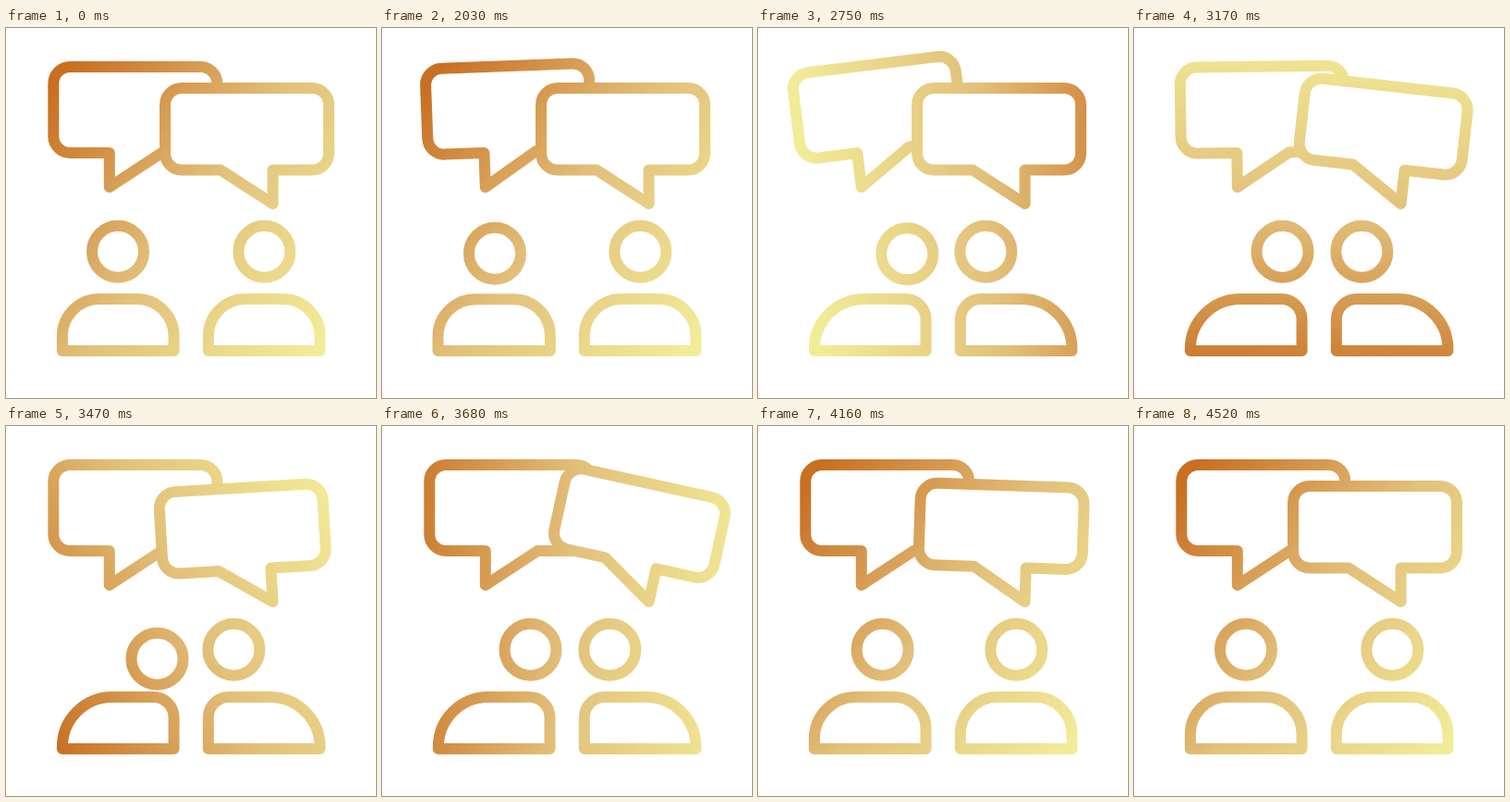
Animation, 400 px wide and 400 px high, one loop 4.55 s. Source, as an HTML page with a canvas:

```html
<!DOCTYPE html>
<html lang="en">
<head>
<meta charset="utf-8">
<title>Conversation</title>
<style>
  html, body { margin: 0; width: 100%; height: 100%; overflow: hidden; background: #fff; }
  canvas { display: block; width: 400px; height: 400px; }
</style>
</head>
<body>
<canvas id="stage" width="400" height="400"></canvas>
<script>
const ctx = document.getElementById('stage').getContext('2d');
const LOOP = 4550, START = 2000, STEP = 30;
const SWING = 212, TURN = 300, DIP = 240;

const unit = (t, start, span) => Math.min(1, Math.max(0, (t - start) / span));
const ease = u => Math.sin(Math.PI * u / 2) ** 2;
const bump = (t, start, span) => Math.sin(Math.PI * unit(t, start, span)) ** 2;

// Eases from rest through evenly spaced peaks and back to rest.
function sway(t, start, peaks) {
  const stops = [0, ...peaks, 0];
  const u = unit(t, start, SWING * (stops.length - 1)) * (stops.length - 1);
  const i = Math.min(Math.floor(u), stops.length - 2);
  return stops[i] + (stops[i + 1] - stops[i]) * ease(u - i);
}

// The gradient line makes one full turn around the middle of the stage.
function shine(t) {
  const u = unit(t, START, 2200);
  const angle = (37 + 360 * ease(u ** 0.8)) * Math.PI / 180;
  const shift = 60 * Math.max(0, Math.sin(2 * Math.PI * u));
  const at = d => [200 + d * Math.cos(angle), 200 + d * Math.sin(angle)];
  const paint = ctx.createLinearGradient(...at(-200 - shift), ...at(200 - shift));
  paint.addColorStop(0, '#c86f22');
  paint.addColorStop(0.5, '#e2c07a');
  paint.addColorStop(1, '#f2ec98');
  return paint;
}

// The path is built in local space and painted in stage space.
function shape(x, y, dir, build) {
  ctx.save();
  ctx.translate(x, y);
  ctx.scale(dir, 1);
  ctx.beginPath();
  build();
  ctx.closePath();
  ctx.restore();
  ctx.fill();
  ctx.stroke();
}

function bubble(x, y, dir, angle, top, base) {
  const l = -60.5, r = 116.5, rad = 18;
  shape(x, y, dir, () => {
    ctx.rotate(-angle * Math.PI / 180);
    ctx.moveTo(0, 0);
    ctx.lineTo(0, base);
    ctx.arcTo(l, base, l, top, rad);
    ctx.arcTo(l, top, r, top, rad);
    ctx.arcTo(r, top, r, base, rad);
    ctx.arcTo(r, base, 56.5, base, rad);
    ctx.lineTo(56.5, base);
  });
}

// Turns to the middle and back, ducking at each turn, with nods between.
function person(t, x0, dir, { out, back, reach, nods = [] }) {
  const turn = ease(unit(t, out, TURN)) - ease(unit(t, back, TURN));
  const duck = bump(t, out, DIP) + bump(t, back - 60, DIP);
  const nod = nods.reduce((sum, start) => sum + 10 * bump(t, start, TURN), 0);
  const squash = 0.04 * duck;
  shape(x0, 0, dir, () => {
    ctx.translate(121.2, 349);
    ctx.scale(1 + squash, 1 - squash);
    ctx.moveTo(-60.3, 0);
    ctx.arcTo(-60.3, -56, 0, -56, 40 + 14 * turn);
    ctx.arcTo(60.3, -56, 60.3, 0, 40 - 18 * turn);
    ctx.lineTo(60.3, 0);
  });
  shape(x0, 0, dir, () =>
    ctx.arc(121 + reach * turn + 0.3 * nod, 241.8 + 13 * duck + nod, 28, 0, 2 * Math.PI));
}

function draw(t) {
  ctx.clearRect(0, 0, 400, 400);
  ctx.fillStyle = '#fff';
  ctx.strokeStyle = shine(t);
  ctx.lineWidth = 12;
  ctx.lineJoin = 'round';
  bubble(111.8, 172, 1, sway(t, 1985, [20, 3, 9, 6, 2]), -130, -37);
  bubble(288.5, 190, -1, sway(t, 3070, [14, -4, 13, -5, 2]), -125, -36.5);
  person(t, 0, 1, { out: 2000, back: 3980, reach: 39.5, nods: [2700, 3320] });
  person(t, 400.3, -1, { out: 2075, back: 3860, reach: 33 });
}

const begin = performance.now();
function tick() {
  const t = (performance.now() - begin) % LOOP;
  draw(t < START + STEP ? 0 : START + Math.floor((t - START) / STEP) * STEP);
  requestAnimationFrame(tick);
}
tick();
</script>
</body>
</html>
```
